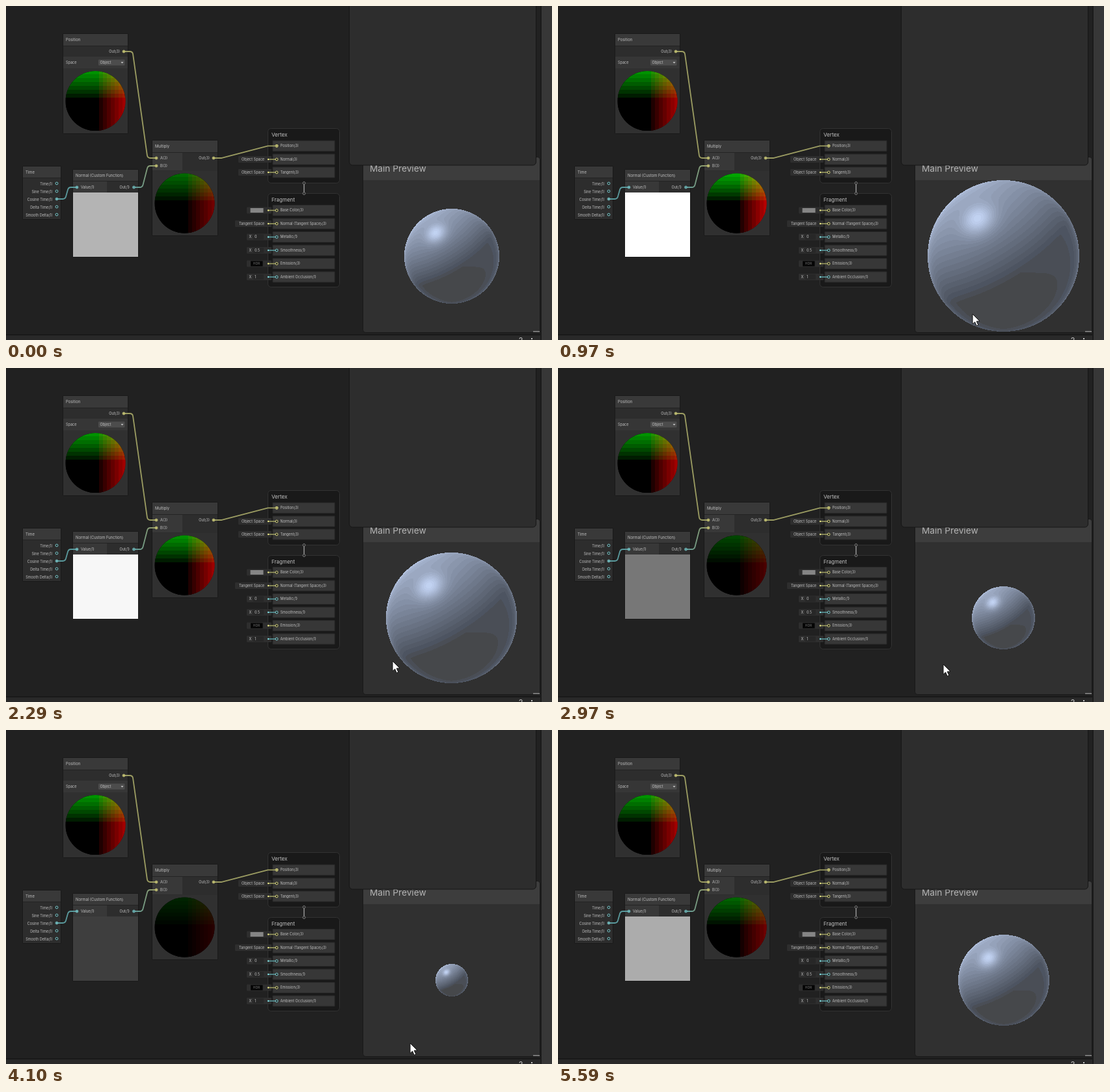
Animation, 839 px wide and 514 px high, one loop 5.61 s. Source, as an HTML page with a canvas:

```html
<!DOCTYPE html>
<html lang="en">
<head>
<meta charset="utf-8">
<title>Shader graph preview</title>
<style>
html, body { margin: 0; width: 100%; height: 100%; overflow: hidden; background: #212121; }
canvas { display: block; }
</style>
</head>
<body>
<canvas id="stage" width="839" height="514"></canvas>
<script>
const ctx = document.getElementById('stage').getContext('2d');
const LOOP = 5610;
const YELLOW = '#9c9d62', TEAL = '#5a9a9d', YPORT = '#e6e486', TPORT = '#84dde0';

// [start ms, preview radius]
const radii = [[0, 73], [150, 98.5], [580, 116.5], [1090, 124], [1600, 118.5], [2020, 100.5],
  [2600, 74.5], [2970, 48.5], [3670, 28.5], [4100, 25], [4670, 26.8], [5190, 46], [5590, 70]];
// [start ms, tip x, tip y]; off stage when y is past the bottom
const pointer = [[0, 0, 600], [730, 650, 500], [850, 644, 487], [970, 637, 474], [1090, 631, 471],
  [1210, 625, 468], [1330, 618, 466], [1480, 614, 462], [1750, 604, 451], [1870, 596, 441],
  [2020, 595, 445], [2140, 594, 447], [2290, 594, 451], [2970, 592, 456], [3090, 590, 459],
  [3210, 589, 461], [3360, 588, 463], [4100, 621, 482], [4250, 694, 493], [4400, 769, 498],
  [4550, 781, 502], [4670, 788, 508], [4790, 0, 600]];
const at = (keys, t) => keys.filter(k => k[0] <= t).pop();

function box(x, y, x2, y2, fill, stroke, radius = 0) {
  ctx.beginPath();
  ctx.roundRect(x, y, x2 - x, y2 - y, radius);
  if (fill) { ctx.fillStyle = fill; ctx.fill(); }
  if (stroke) { ctx.strokeStyle = stroke; ctx.lineWidth = 1; ctx.stroke(); }
}

// y is the middle of the capitals
function label(str, x, y, size = 5.5, align = 'left', color = '#c2c2c2') {
  ctx.font = `${size}px Inter, sans-serif`;
  ctx.textAlign = align;
  ctx.fillStyle = color;
  ctx.fillText(str, x, y + size * 0.36);
}

function port(x, y, color, linked) {
  ctx.beginPath();
  ctx.arc(x, y, 1.9, 0, 7);
  ctx.fillStyle = '#1c1c1c';
  ctx.fill();
  ctx.strokeStyle = color;
  ctx.lineWidth = 0.9;
  ctx.stroke();
  if (linked) dot(x, y, 1.1, color);
}

function dot(x, y, r, color) {
  ctx.beginPath();
  ctx.arc(x, y, r, 0, 7);
  ctx.fillStyle = color;
  ctx.fill();
}

// Wire with rounded corners at the two bends
function wire(x1, y1, bend1, bend2, x2, y2, color, color2 = color) {
  const paint = ctx.createLinearGradient(x1, 0, x2, 0);
  paint.addColorStop(0, color);
  paint.addColorStop(1, color2);
  ctx.beginPath();
  ctx.moveTo(x1, y1);
  ctx.arcTo(bend1, y1, bend2, y2, 5);
  ctx.arcTo(bend2, y2, x2, y2, 5);
  ctx.lineTo(x2, y2);
  ctx.strokeStyle = paint;
  ctx.lineWidth = 1.8;
  ctx.stroke();
}

function node(title, x, y, x2, y2, titleEnd) {
  box(x, y, x2, y2, '#2d2d2d');
  box(x, y, x2, titleEnd, '#393939');
  box(x, titleEnd, x2, titleEnd + 1, '#232323');
  label(title, x + 4, (y + titleEnd) / 2, 5.9);
  box(x - 0.5, y - 0.5, x2 + 0.5, y2 + 0.5, null, '#191919', 1);
}

// Ball coloured by position: red to the right, green upwards, in coarse cells
function positionBall(cx, cy, gain) {
  const R = 46, cell = 6;
  const shade = (i, max) => i < 1 ? 0 : Math.min(255, max * gain * (i / 7.2) ** 0.85);
  ctx.save();
  ctx.beginPath();
  ctx.arc(cx, cy, R, 0, 7);
  ctx.clip();
  box(cx - R, cy - R, cx + R, cy + R, '#000');
  for (let i = 0; i < 8; i++) for (let j = 0; j < 8; j++) {
    const x = i ? Math.round(cx) - 1 + i * cell : cx - R;
    const y = Math.round(cy) + 1 - j * cell;
    ctx.fillStyle = `rgb(${shade(i, 165)},${shade(j, 150)},0)`;
    ctx.fillRect(x, y - cell, i ? cell : R + 6, j ? cell : R + 8);
    if (!j) ctx.fillRect(x, y - cell, i ? cell : R + 6, R + cell);
  }
  ctx.restore();
}

// Lit ball with banded shading
const ballCache = {};
function litBall(r) {
  if (ballCache[r]) return ballCache[r];
  const size = Math.ceil(r * 2) + 2, mid = size / 2;
  const canvas = document.createElement('canvas');
  canvas.width = canvas.height = size;
  const g = canvas.getContext('2d');
  const img = g.createImageData(size, size);
  for (let py = 0; py < size; py++) for (let px = 0; px < size; px++) {
    const x = (px + 0.5 - mid) / r, y = (py + 0.5 - mid) / r, rr = x * x + y * y;
    if (rr > 1) continue;
    const z = Math.sqrt(1 - rr);
    const diffuse = Math.max(0, -0.54 * x - 0.78 * y + 0.31 * z);
    const gloss = Math.max(0, -0.335 * x - 0.48 * y + 0.81 * z) ** 42;
    const rim = (1 - z) ** 4 * (0.35 + 0.65 * Math.abs(x));
    let lum = 77 - 9 * y + 82 * diffuse + 64 * gloss + 62 * rim;
    lum = Math.round(lum / 6) * 6;
    const tint = Math.min(1, Math.max(0, (lum - 68) / 15));
    img.data.set([lum * (1 - 0.08 * tint), lum, lum * (1 + 0.15 * tint), 255], (py * size + px) * 4);
  }
  g.putImageData(img, 0, 0);
  return ballCache[r] = canvas;
}

function slot(name, y, color, linked) {
  box(410, y - 8, 505, y + 8, '#373737', '#2b2b2b');
  if (!linked) {
    ctx.fillStyle = color === YPORT ? YELLOW : TEAL;
    ctx.fillRect(403, y - 0.8, 12, 1.6);
    dot(403, y, 1.2, color);
  }
  port(416, y, color, linked);
  label(name, 421.5, y);
}

function chip(x, y) { box(x, y - 5, 408, y + 5, '#2e2e2e', null, 1); }

function numberChip(value, y) {
  chip(370, y);
  box(380, y - 4, 396, y + 4, '#272727', null, 1);
  label('X', 373.5, y);
  label(value, 382, y);
}

function spaceChip(str, x, y) {
  chip(x, y);
  label(str, 397, y, 5.5, 'right');
}

function stack(title, y, y2) {
  box(402.5, y + 0.5, 512.5, y2 + 0.5, '#191919', '#323232', 5);
  label(title, 408, y + 10, 8);
}

function graph(value) {
  const gray = Math.min(255, Math.round(value * 255));

  node('Position', 88, 43, 187, 196, 61);
  label('Out(3)', 175, 70, 5.5, 'right');
  box(88, 78, 187, 96, '#363636');
  label('Space', 92, 87);
  box(142, 82.5, 182.5, 91.5, '#4c4c4c', null, 1);
  label('Object', 144.5, 87);
  ctx.beginPath();
  ctx.moveTo(176.5, 86); ctx.lineTo(180.5, 86); ctx.lineTo(178.5, 88.4);
  ctx.fillStyle = '#c2c2c2';
  ctx.fill();
  box(88, 96, 187, 196, '#303030');
  positionBall(137.5, 146, 1);

  node('Time', 26, 247, 84, 328, 264);
  ['Time(1)', 'Sine Time(1)', 'Cosine Time(1)', 'Delta Time(1)', 'Smooth Delta(1)']
    .forEach((s, i) => label(s, 71.5, 274 + i * 12, 5.5, 'right'));

  node('Normal (Custom Function)', 103, 252, 203, 386, 269);
  box(103, 270, 155, 287, '#383838');
  label('Value(1)', 115, 279);
  label('Out(1)', 190, 279, 5.5, 'right');
  box(103, 287, 203, 386, `rgb(${gray},${gray},${gray})`);

  node('Multiply', 225, 207, 325, 353, 225);
  box(225, 226, 271, 253, '#383838');
  label('A(3)', 237, 234);
  label('B(3)', 237, 246);
  label('Out(3)', 313, 234, 5.5, 'right');
  box(225, 254, 325, 353, '#303030');
  positionBall(274.5, 303.5, value);

  stack('Vertex', 188, 272);
  stack('Fragment', 288, 432);
  box(457, 274, 459, 287, '#777');
  port(458, 272.5, '#8a8a8a');
  port(458, 288.5, '#8a8a8a');

  spaceChip('Object Space', 357, 236);
  spaceChip('Object Space', 357, 256);
  chip(370, 314.5);
  box(375.5, 311, 395.5, 318, '#858585');
  spaceChip('Tangent Space', 352, 335);
  numberChip('0', 355.5);
  numberChip('0.5', 376);
  chip(370, 396.5);
  box(376, 392.5, 394.5, 400.5, '#050505');
  label('HDR', 385, 396.5, 5, 'center', '#777');
  numberChip('1', 417);

  slot('Position(3)', 215.3, YPORT, true);
  slot('Normal(3)', 236, YPORT);
  slot('Tangent(3)', 256, YPORT);
  slot('Base Color(3)', 314.5, YPORT);
  slot('Normal (Tangent Space)(3)', 335, YPORT);
  slot('Metallic(1)', 355.5, TPORT);
  slot('Smoothness(1)', 376, TPORT);
  slot('Emission(3)', 396.5, YPORT);
  slot('Ambient Occlusion(1)', 417, TPORT);

  wire(181, 70, 194.5, 217.5, 231, 234, YELLOW);
  wire(78, 297, 91, 96, 109, 279, TEAL);
  wire(196.5, 279, 209.5, 218, 231, 246, TEAL, YELLOW);
  wire(319, 234, 331, 403, 416, 215.3, YELLOW);

  port(181, 70, YPORT, true);
  for (let i = 0; i < 5; i++) port(78, 273 + i * 12, TPORT, i === 2);
  port(109, 279, TPORT, true);
  port(196.5, 279, TPORT, true);
  port(231, 234, YPORT, true);
  port(231, 246, YPORT, true);
  port(319, 234, YPORT, true);
  port(416, 215.3, YPORT, true);
}

function panels(r) {
  box(548.5, 232.5, 820.5, 502.5, '#303030', '#191919', 4);
  box(549, 233, 820, 268, '#3d3d3d', null, [4, 4, 0, 0]);
  label('Main Preview', 559, 249.7, 13.7, 'left', '#b4b4b4');
  ctx.save();
  ctx.beginPath();
  ctx.rect(549, 268, 271, 234);
  ctx.clip();
  const ball = litBall(r);
  ctx.drawImage(ball, Math.round(684.5 - ball.width / 2), Math.round(384.5 - ball.width / 2));
  ctx.restore();
  box(810, 500, 820, 502, '#777');

  box(527.5, -8, 814.5, 245, '#2d2d2d', '#161616', 5);

  box(0, 505, 822, 507, '#191919');
  box(0, 507, 822, 514, '#292929');
  box(821, 0, 823, 514, '#1b1b1b');
  box(823, 0, 839, 514, '#373737');
  label('?', 791, 515, 12, 'center');
  box(807, 511, 809, 513, '#c4c4c4');
}

function arrow(x, y) {
  ctx.save();
  ctx.translate(x, y);
  ctx.beginPath();
  [[0, 0], [0, 15.5], [3.6, 12.2], [6.2, 18.2], [8.8, 17], [6.2, 11.2], [11, 11]]
    .forEach(p => ctx.lineTo(...p));
  ctx.closePath();
  ctx.fillStyle = '#fff';
  ctx.fill();
  ctx.strokeStyle = '#111';
  ctx.lineWidth = 1;
  ctx.stroke();
  ctx.restore();
}

function draw(now) {
  const t = now % LOOP;
  const r = at(radii, t)[1];
  const [, x, y] = at(pointer, t);
  box(0, 0, 839, 514, '#212121');
  graph(r * 2.46 / 255);
  panels(r);
  arrow(x, y);
}

const start = performance.now();
function tick() {
  draw(performance.now() - start);
  requestAnimationFrame(tick);
}
tick();
</script>
</body>
</html>
```
